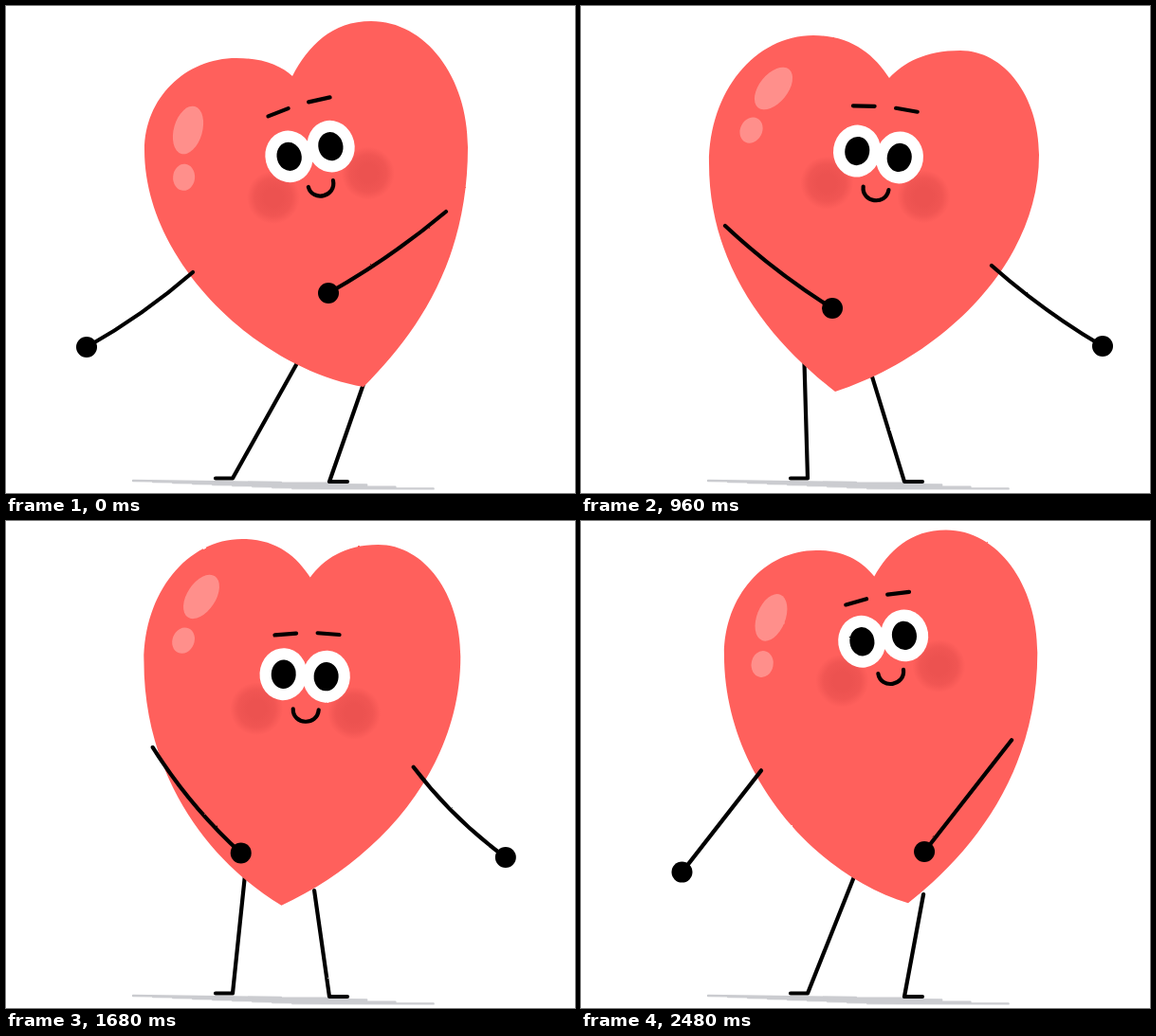
Write an HTML page that moves like this. It is 600 by 514 pixels and loops after 2560 ms.

```html
<!DOCTYPE html>
<html lang="en">
<head>
<meta charset="utf-8">
<title>Swaying heart</title>
<style>
  html, body { margin: 0; width: 100%; height: 100%; overflow: hidden; background: #fff; }
  svg { display: block; width: 100%; height: 100%; }
  .line { fill: none; stroke: #000; stroke-width: 4.2; stroke-linecap: round; stroke-linejoin: round; }
</style>
</head>
<body>
<svg viewBox="0 0 600 514">
  <defs>
    <filter id="rough" filterUnits="userSpaceOnUse" x="0" y="0" width="600" height="514" color-interpolation-filters="sRGB">
      <feTurbulence type="fractalNoise" baseFrequency=".16" numOctaves="2" seed="4"/>
      <feDisplacementMap in="SourceGraphic" scale="1.4" xChannelSelector="R" yChannelSelector="G"/>
    </filter>
    <radialGradient id="blush">
      <stop offset=".35" stop-color="#ec5250"/>
      <stop offset=".7" stop-color="#ec5250" stop-opacity=".75"/>
      <stop offset="1" stop-color="#ec5250" stop-opacity="0"/>
    </radialGradient>
  </defs>
  <g filter="url(#rough)">
    <path id="shadow" fill="none" stroke="#cbccd0" stroke-width="2.4" stroke-linecap="round"/>
    <path id="legs" class="line"/>
    <path id="heart" fill="#ff605c"/>
    <g id="shine" fill="#ff8f8b">
      <ellipse rx="15" ry="26" transform="rotate(11)"/>
      <ellipse cy="50" rx="11.5" ry="14"/>
    </g>
    <g id="face">
      <circle cx="-49" cy="38" r="28" fill="url(#blush)"/>
      <circle cx="54" cy="37" r="28" fill="url(#blush)"/>
      <g fill="#fff">
        <ellipse cx="-22.7" rx="25" ry="27.5"/>
        <ellipse cx="22.7" rx="25" ry="27.5"/>
      </g>
      <ellipse cx="-22.5" rx="13" ry="15.2"/>
      <ellipse cx="22.5" rx="13" ry="15.2"/>
      <path class="line" d="M-10.500 36C-10 53 16 53 16.500 35.500"/>
      <path id="brows" class="line" d="M-34 -46.500L-11.500 -49.500M11 -51L34 -50.500"/>
    </g>
    <g id="armL"><path class="line"/><circle r="11"/></g>
    <g id="armR"><path class="line"/><circle r="11"/></g>
  </g>
</svg>
<script>
const STEP = 80, SWAY = 8;

const el = id => document.getElementById(id);
const put = (node, name, value) => node.setAttribute(name, value);
const place = (id, x, y, a) => put(el(id), 'transform', `translate(${x} ${y}) rotate(${a})`);
const power = (v, n) => Math.sign(v) * Math.abs(v) ** n;

// Cubic from p to q; each handle is a share of the way along x and y.
function curve([px, py], [qx, qy], [ax, ay], [bx, by]) {
  const dx = qx - px, dy = qy - py;
  return `C${px + ax * dx} ${py + ay * dy} ${qx - bx * dx} ${qy - by * dy} ${qx} ${qy}`;
}

// One half: cleft, top of the lobe, widest point, tip.
function half(cleft, top, side, tip, dir, angle, len) {
  const a = angle * Math.PI / 180;
  const hx = tip[0] + dir * len * Math.cos(a), hy = tip[1] - len * Math.sin(a);
  return curve(cleft, top, [.2, .55], [.5, 0]) + curve(top, side, [.56, 0], [0, .56]) +
    `C${side[0]} ${side[1] + .47 * (tip[1] - side[1])} ${hx} ${hy} ${tip}`;
}

function drawArm(id, x, y, hx, hy, bend) {
  const [line, hand] = el(id).children;
  const len = Math.hypot(hx - x, hy - y);
  const cx = (x + hx) / 2 + 2 * bend * (hy - y) / len;
  const cy = (y + hy) / 2 - 2 * bend * (hx - x) / len;
  put(line, 'd', `M${x} ${y}Q${cx} ${cy} ${hx} ${hy}`);
  put(hand, 'cx', hx);
  put(hand, 'cy', hy);
}

function draw(step) {
  const turn = 2 * Math.PI * step / SWAY;
  const c = Math.cos(turn), q = Math.sin(turn);
  const lean = power(c, 2);      // 1 = tip to the right, -1 = tip to the left
  const swing = power(c, .7);    // arms linger at the ends
  const lift = q * q;            // stretch in mid sway
  const bob = Math.sin(2 * turn);

  const cleft = [313.5 - 11.5 * lean + 3 * lift, 75 - lean - 32 * lift];
  const tip = [322.5 + 54.5 * lean + 5 * q - 2.5 * lift, 404.5 - 2.5 * lean];
  const topR = [392.5 - 7.5 * lean - 7.5 * lift, 31.5 - 15.5 * lean - 28.5 * lift];
  const topL = [244 - lean + 9 * lift, 43 + 12 * lean - 34 * lift + 1.5 * q];
  const sideR = [485 + 2 * lean + q - 8 * lift, 153 - 4 * lean - 24 * lift];
  const sideL = [140.5 + 5.5 * lean + 1.5 * q + 17.5 * lift, 159 - 7 * lean - 29 * lift];
  const halfR = half(cleft, topR, sideR, tip, 1, 31.5 + 13.5 * lean, 98 - 17 * lean);
  const halfL = half(cleft, topL, sideL, tip, -1, 24 - 14 * lean, 98 + 17 * lean);
  put(el('heart'), 'd', `M${cleft}${halfR}L${cleft}${halfL}L${cleft}Z`);

  const hip = 36 * lean + 5 * lift;
  put(el('legs'), 'd', `M${271.5 + hip + 6 * q} 376L239 498.500H221` +
    `M${342 + hip + 2 * q} ${392 + 4 * lean}L341 502H360`);

  place('shine', 197.5 - 5.5 * lean + 11.5 * lift, 109 + 22 * lean + 3 * q - 32 * lift, 16.5 - 11.5 * lean);
  place('face', 317 + 3.5 * lean + 4 * q + 5.5 * lift, 155 - 1.5 * lean + 18.7 * bob - 23 * lift, -2.5 - 11.2 * lean);
  put(el('brows'), 'transform', `translate(0 ${8 * Math.abs(q)})`);

  const bend = 3.5 * (c + q), inner = 28 * lift * swing;
  drawArm('armL', 174.5 + 22.5 * swing + 3 * q, 256.5 + 24.5 * lean - 8 * lift + 2 * q,
    175 - 90 * swing - 3 * q, 339.5 + 20.5 * swing + 42 * lift - inner - 5 * bob, bend);
  drawArm('armR', 448.5 + 15.5 * swing + 3 * q - 9 * lift, 245.5 - 28.5 * lean,
    445 - 105 * swing - 7 * q - 11 * lift, 331 - 28 * swing + 42 * lift + inner - 8 * bob, bend);
  // the right arm blinks out once in every second sway
  put(el('armR'), 'visibility', step % 16 === 9 ? 'hidden' : 'visible');
}

// Scribbled ground shadow: overlapping strokes that drift right and down.
let strokes = '';
for (let i = 0; i < 9; i++) {
  const x = 134 + 21 * i, end = 290 + 60 * (i * .618 % 1) + 13 * i;
  strokes += `M${x} ${501 + i}L${end} ${503 + .8 * i}`;
}
put(el('shadow'), 'd', strokes);

const start = performance.now();
let shown = -1;
function tick() {
  const step = Math.floor((performance.now() - start) / STEP) % (4 * SWAY);
  if (step !== shown) draw(shown = step);
  requestAnimationFrame(tick);
}
tick();
</script>
</body>
</html>
```
